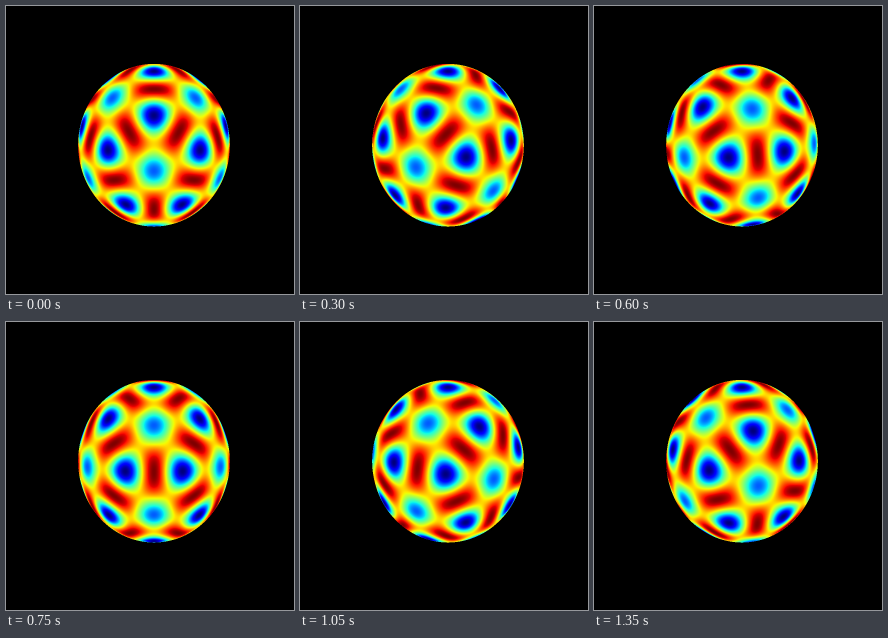
These frames come from a looping animation (288 px wide and 288 px high, 1500 ms). A matplotlib script:

```python
import numpy as np
import matplotlib.pyplot as plt
from matplotlib.animation import FuncAnimation
from numpy.polynomial.legendre import Legendre

SIZE, DPI = 288, 72
FRAMES, INTERVAL = 10, 150
TURN = np.radians(120)          # three-fold symmetry closes the loop
SS = 3                          # supersampling

CX, CY, RADIUS = 148.0, 139.6, 75.7
STRETCH = 1.095                 # z axis is drawn taller
ELEV, DIST = np.radians(30), 16.0


def unit(colat, az):
    return np.array([np.sin(colat) * np.cos(az),
                     np.sin(colat) * np.sin(az),
                     np.cos(colat)])


# Six icosahedron axes, with a face centre at the pole
inner = np.arccos(np.sqrt((5 + 2 * np.sqrt(5)) / 15))
outer = np.arccos(np.sqrt((5 - 2 * np.sqrt(5)) / 15))
THIRDS = np.radians([0, 120, 240])
AXES = np.array([unit(inner, a + np.pi / 3) for a in THIRDS]
                + [unit(outer, a) for a in THIRDS])
P10 = Legendre.basis(10)


def harmonic(p):
    """Icosahedral harmonic of degree 10, for points p of shape (n, 3)."""
    return P10(p @ AXES.T).sum(axis=1)


# Extremes: face centres and the rims between them
HIGH = harmonic(np.array([[0.0, 0.0, 1.0]]))[0]
colat, az = np.meshgrid(np.linspace(0, np.pi, 181), np.linspace(0, 2 * np.pi, 241))
LOW = harmonic(unit(colat.ravel(), az.ravel()).T).min()


def cast_rays():
    """Hit mask and surface points seen by each subpixel."""
    c = (np.arange(SIZE * SS) + 0.5) / SS
    sx, sy = np.meshgrid((c - CX) / RADIUS, (CY - c) / RADIUS)
    toward = np.array([np.cos(ELEV), 0, np.sin(ELEV)])
    right = np.array([0, 1, 0])
    up = np.array([-np.sin(ELEV), 0, np.cos(ELEV)])
    squash = np.array([1, 1, 1 / STRETCH])

    eye = DIST * toward * squash
    ray = (sx[..., None] * right + sy[..., None] * up - DIST * toward) * squash
    a = (ray ** 2).sum(-1)
    b = ray @ eye
    disc = b ** 2 - a * (eye @ eye - 1)
    hit = disc > 0
    t = (-b[hit] - np.sqrt(disc[hit])) / a[hit]
    return hit, eye + t[:, None] * ray[hit]


HIT, POINTS = cast_rays()
JET = plt.get_cmap("jet")


def render(i):
    s = TURN * i / FRAMES
    spin = np.array([[np.cos(s), -np.sin(s), 0],
                     [np.sin(s), np.cos(s), 0],
                     [0, 0, 1]])
    level = (HIGH - harmonic(POINTS @ spin.T)) / (HIGH - LOW)
    img = np.zeros(HIT.shape + (3,))
    img[HIT] = JET(level)[:, :3]
    return img.reshape(SIZE, SS, SIZE, SS, 3).mean(axis=(1, 3))


fig = plt.figure(figsize=(SIZE / DPI, SIZE / DPI), dpi=DPI, facecolor="black")
ax = fig.add_axes([0, 0, 1, 1])
ax.axis("off")
picture = ax.imshow(render(0), interpolation="nearest", aspect="auto")


def update(i):
    picture.set_data(render(i))
    return [picture]


anim = FuncAnimation(fig, update, frames=FRAMES, interval=INTERVAL,
                     repeat=True, repeat_delay=0, blit=False)
plt.show()
```
